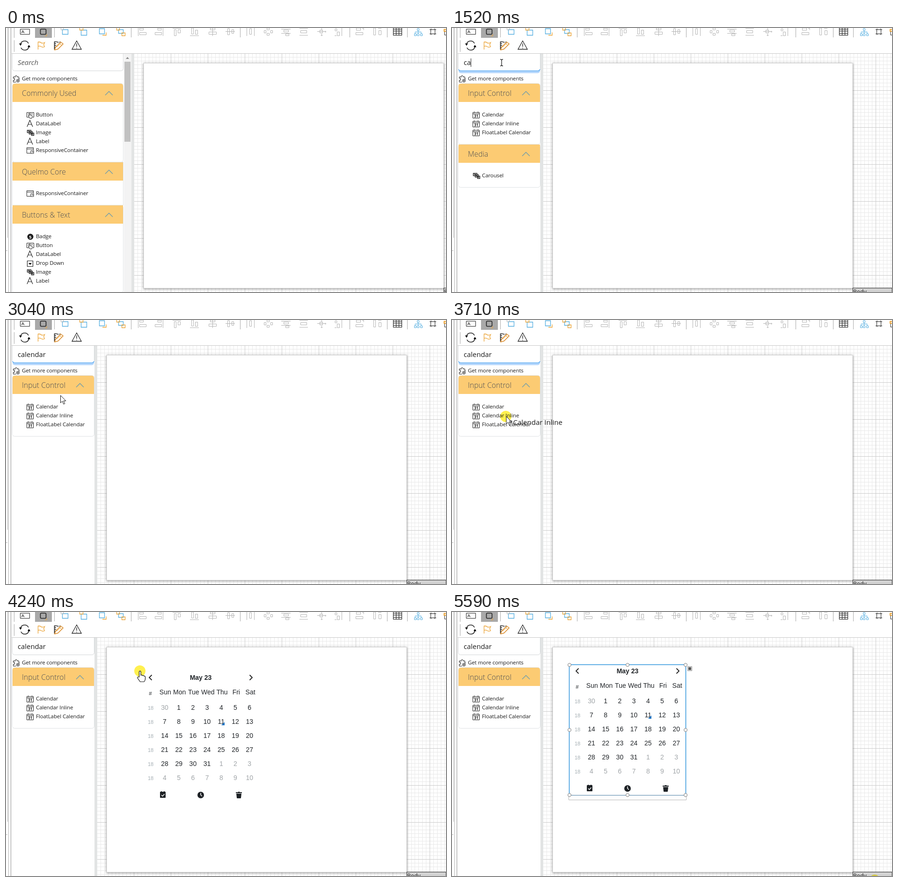
These frames come from a looping animation (940x564 px, 5.66 s). An HTML page:

```html
<!DOCTYPE html>
<html lang="en">
<head>
<meta charset="utf-8">
<title>Form designer</title>
<style>
html, body { margin: 0; height: 100%; overflow: hidden; background: #fff; }
svg { display: block; width: 100vw; height: 100vh; }
text { font-family: "Open Sans", "Noto Sans", sans-serif; fill: #1c1c1c; }
.item { font-size: 11.5px; letter-spacing: -.1px; }
.title { font-size: 15.7px; font-weight: 300; fill: #4c4f54; }
.input { font-size: 14.85px; }
.hint { font-style: italic; fill: #555; }
.drag { font-size: 15px; }
.cal text { font: 14px "Liberation Sans", Arial, sans-serif; fill: #212529; text-anchor: middle; }
.cal .month { font-weight: bold; }
.cal .week { font-size: 11px; fill: #a3adb2; }
.cal .hash { font-size: 11.5px; }
.cal .muted { fill: #a0a5a8; }
.line { fill: none; stroke: #222; }
.grey { fill: none; stroke: #b4b4b4; }
.blue { fill: none; stroke: #55aee0; }
.gold { fill: none; stroke: #eba53a; }
.spot { fill: #fff04f; mix-blend-mode: multiply; }
</style>
</head>
<body>
<svg id="stage" viewBox="0 0 940 564" xmlns="http://www.w3.org/2000/svg">
  <defs>
    <pattern id="grid" width="79" height="79" patternUnits="userSpaceOnUse"></pattern>
    <filter id="shadow" x="-5%" y="-5%" width="110%" height="110%">
      <feDropShadow dx="0" dy="1" stdDeviation="2" flood-color="#000" flood-opacity=".5"/>
    </filter>
    <g id="i-button">
      <path class="line" d="M5 5.500H.5V-4.500H15.500V5.500H13M3-1.500h3M3 1.500h2M10-1.500h3"/>
      <path d="M6 2V-2.500q1-1 2 0V1l4 1v3l-1 3H7L4 3Z" fill="#fff" stroke="#222"/>
    </g>
    <path id="i-label" class="line" stroke-width="1.200" d="M1 7 7-7 13 7M3.200 2H10.800"/>
    <g id="i-image" class="line">
      <path d="M1.500-4.500h8v5h-8zM5.500-1.500h7v5h-7z" fill="#fff" stroke-width="1.400"/>
      <path d="M10.500 1.500h5v5h-5zM3-2.500h4M8 1.500h3M12 4h2" stroke-width="1.400"/>
    </g>
    <g id="i-container">
      <path class="line" d="M9 6.500H.5V-5.500H14.500V0M.5-2.500h14"/>
      <path d="M9 1h6v6H9z" fill="#fff" stroke="#222"/><path d="M11 3h3v2z" fill="#222"/>
    </g>
    <g id="i-badge">
      <circle cx="8" cy="1" r="6.500" fill="#1d1d1d"/>
      <text x="5.300" y="4.500" font-size="9.500" font-weight="700" style="fill:#fff">5</text>
    </g>
    <g id="i-drop">
      <path class="line" stroke-width="1.200" d="M1.500-4.500h12v12h-12z"/><path d="M4 0h7L7.500 4Z"/>
    </g>
    <g id="i-date">
      <path class="line" d="M.5-4.500h14v12H.5zM.5-1.500h14M3.500-6.500v3M11.500-6.500v3"/>
      <text x="3.200" y="6" font-size="8" font-weight="700">31</text>
    </g>
  </defs>

  <rect width="940" height="564" fill="#fff"/>
  <g id="field">
    <rect x="195" y="55" width="745" height="510" fill="url(#grid)"/>
    <rect x="215" y="75" width="641" height="481" fill="#fff" stroke="#aaa" stroke-width=".6" filter="url(#shadow)"/>
    <path d="M856 570V555.500H940V570" fill="#d2d2d2" stroke="#222"/>
    <text x="857" y="568" font-size="12">Body</text>
  </g>

  <g id="panel">
    <rect id="back" x="12" y="55" height="510" fill="#fff"/>
    <rect id="split" y="55" width="6" height="510" fill="#e2e4e4"/>
    <g id="scroll">
      <rect x="252" y="55" width="16" height="510" fill="#f3f3f3"/>
      <rect x="253" y="72" width="13" height="171" fill="#c1c1c1"/>
      <path d="M256 66h7l-3.500-4Z" fill="#888"/>
    </g>
    <rect id="glow" x="14" y="80" height="16.500" rx="5" fill="#b5d7fc"/>
    <rect id="box" x="13.500" y="50" height="41.500" rx="5" fill="#fff" stroke="#d3d6d8"/>
    <path id="rule" fill="none" stroke="#62aef2" stroke-width="1.500"/>
    <rect x="12" y="45" width="260" height="9" fill="#fff"/>
    <text id="hint" class="input hint" x="25" y="79">Search</text>
    <text id="query" class="input" x="25" y="79"></text>
    <path id="caret" class="line" d="M.5 65v18"/>
    <path class="line" d="M15.500 115.500v-4h3v-4h-3v-3h5q-2-3 1-3t2 3h4v4m-6 7h-6M28 107v3"/>
    <circle class="line" cx="25.500" cy="112.500" r="3.200"/><path class="line" d="M23.500 112.500h4M25.500 110.500v4"/>
    <text class="item" x="34" y="112">Get more components</text>
    <g id="all"></g><g id="some"></g><g id="few"></g>
  </g>

  <g id="chrome">
    <path class="grey" d="M3.500 0V448M5.500 0V564M0 475.500H3" />
    <path d="M10.500 0V564" stroke="#8e8e8e"/>
    <path d="M12 54.500H940" stroke="#c8c8c8"/>
    <path d="M17.500 0V21M17.500 26V51M103.500 0V20M267.500 0V20M500.500 0V20M734.500 0V20M814.500 0V20M857.500 0V20" stroke="#a9a9a9"/>
    <path class="line" d="M30.500 2.500h20v11h-20zM33 11l3-6 3 6M34.500 9h3"/>
    <rect x="62" y="0" width="36" height="21" fill="#a9a9a9"/>
    <rect class="line" x="73.500" y="2.500" width="12" height="11" rx="2" stroke-width="1.600"/>
    <path class="gold" d="M83 17h4v-4"/>
    <path class="blue" d="M120.500 3.500h12v10h-12zM160.500 4.500h12v11h-12zM199.500 1.500h11v11h-11zM240.500 3.500h10v8h-10z" stroke-width="1.300"/>
    <path class="gold" d="M157.500 0v4.500h7V0M206 15.500h8v-6M236.500 0v4.500h6V0M247.500 10.500h7v6h-7z" stroke-width="1.300"/>
    <path class="grey" d="M117.500 0v4h5V0"/>
    <g class="grey">
      <path d="M282.500 0v17M285.500.5h8v4h-8zM285.500 9.500h14v5h-14zM335.500 0v17M324 .5h8v4h-8zM318.500 9.500h14v5h-14z"/>
      <path d="M356 .5h18M359.500 3.500h4v13h-4zM367.500 3.500h5v7h-5zM393 16.500h19M396.500 0h4v13h-4zM404.500 4.500h5v9h-5z"/>
      <path d="M441.500 0v17M436.500 0h10v4h-10zM433.500 8.500h16v5h-16zM469 7.500h20M473.500 1.500h4v13h-4zM482.500 3.500h4v8h-4z"/>
      <path d="M514.500 0v17M530.500 0v17M520.500 1.500h4v12h-4zM557.500 0h5v4h-5zM551.500 5.500h4v5h-4zM565.500 5.500h4v5h-4zM557.500 11.500h5v4h-5z"/>
      <path d="M588 2.500h20M593.500 4.500h10v4h-10zM588 11.500h20M597.500 12.500h7v4h-7zM627 .5h18M627 15.500h18M629.500 5.500h13v5h-13z"/>
      <path d="M665 7.500h19M670.500 4.500h6v6h-6zM674.500 0v4m0 8v5m-2-2 2 2 2-2m5-9 2 2-2 2M703 2h4v4h-4zM707.500 8.500h5v8h-5zM717.500 0v17M702 16.500h4"/>
      <path d="M748.500 0h9v5h-9zM747.500 9.500h15v5h-15zM761 .5h3v4M785.500 0h4v15h-4zM796.500 5.500h5v9h-5zM795 .5h7"/>
    </g>
    <path class="line" d="M827.500 0v15.500h18V0M827 2.500h19M827 6.500h19M827 11.500h19M833.500 0v15M839.500 0v15" stroke-width="1.200"/>
    <path class="blue" d="M880.500 5v7M874 12V8.500h13V12M878.500 1.500h4v4h-4zM872.500 12.500h4v4h-4zM878.500 12.500h4v4h-4zM885.500 12.500h4v4h-4z"/>
    <path class="line" d="M907.500 3.500h9v9h-9zM905 3.500h3m0 0V1M919 3.500h-3V1M905 12.500h3V15M919 12.500h-3V15"/>
    <path class="gold" d="M940 3h-4v4h4" stroke-width="2"/><path class="line" d="M937 8v7h3"/>
    <path class="line" stroke-width="1.500" d="M31 35a9 9 0 0 1 17-2M49 40a9 9 0 0 1-17 2"/>
    <path d="M28 33h6l-3 5ZM46 41h6l-3-5Z"/>
    <path class="gold" d="M68.500 46V30q4-1 7 2 4 1 7-1l-2 5 2 4q-4 2-7 0-3-2-7-1" stroke-width="1.300"/>
    <path class="line" d="M103.500 46V29.500h6M104 33.500h3M104 37.500h3M104 41.500h3M111 29v3M115 29v3" stroke-width="1.500"/>
    <path d="M104 47l2-6 11-11 5 4-11 11Z" fill="#fff" stroke="#d98b2b" stroke-width="1.500"/><path class="gold" d="M114 32l5 5M108 41l9-8"/>
    <path class="line" stroke="#444" d="M151 27.500 161 45.500H141ZM151 33v7M151 42v1.500" stroke-width="1.300"/>
  </g>

  <g id="calendar" class="cal"></g>
  <circle id="spot" class="spot" r="12"/>
  <g id="pointer">
    <path id="arrow" d="M.5 0V16l4-3.500L7 18.800l2.700-1.100L7 11.800h5Z" fill="#fff" stroke="#111"/>
    <path id="beam" class="line" stroke-width="1.300" d="M-3-7q3 0 3 2V5q0 2-3 2M3-7Q0-7 0-5V5q0 2 3 2"/>
    <path id="hand" fill="#fff" stroke="#111" stroke-width="1.200" d="M-2 13V2a1.800 1.800 0 0 1 3.600 0V9q3-1 3.600 1 3-1 3.400 1 2.400-.4 2.400 2v4q0 3-2.400 6H0L-5.500 15q-1-3 3.500-2Z"/>
    <g id="ghost"><path class="line" d="M7 9.500h5.500v9"/><text class="drag" x="15" y="17.500">Calendar Inline</text></g>
  </g>
</svg>
<script>
const LOOP = 5660, STEP = 66.3;
const $ = id => document.getElementById(id);
const show = (id, on) => $(id).style.display = on ? '' : 'none';
const move = (id, x, y) => $(id).setAttribute('transform', `translate(${x} ${y})`);
const set = (id, attrs) => Object.entries(attrs).forEach(([k, v]) => $(id).setAttribute(k, v));
const ramp = (t, from, to) => Math.min(1, Math.max(0, (t - from) / (to - from)));

// Grid: ten fine cells in each coarse one
$('grid').setAttribute('patternTransform', 'translate(194 54)');
for (let i = 9; i >= 0; i--) {
  const p = Math.round(i * 7.9) + .5;
  $('grid').innerHTML += `<path d="M${p} 0V79M0 ${p}H79" stroke="${i ? '#e9e9e9' : '#cbcbcb'}"/>`;
}

function section(y, width, title, items, first, last) {
  const right = 14 + width, height = 73 + 19 * items.length, r = first ? 5 : 0;
  const rows = items.map(([icon, name], i) => {
    const mid = y + 66 + 19 * i;
    return `<use href="#i-${icon}" x="44" y="${mid}"/><text class="item" x="64" y="${mid + 4}">${name}</text>`;
  }).join('');
  return `<rect x="13.500" y="${y - .5}" width="${width + 1}" height="${height}" rx="${last ? 5 : r}" fill="#fff" stroke="#dfe2e4"/>
    <path d="M14 ${y + 39}V${y + r}q0-${r} ${r}-${r}H${right - r}q${r} 0 ${r} ${r}V${y + 39}Z" fill="#fccb73"/>
    <text class="title" x="34" y="${y + 26}">${title}</text>
    <path d="M${right - 38} ${y + 24.5}l8-8 8 8" fill="none" stroke="#6f9cae" stroke-width="1.300"/>${rows}`;
}

function accordion(width, sections) {
  let y = 119;
  return sections.map(([title, items], i) => {
    const part = section(y, width, title, items, i === 0, i === sections.length - 1);
    y += 73 + 19 * items.length;
    return part;
  }).join('');
}

const button = ['button', 'Button'], data = ['label', 'DataLabel'], image = ['image', 'Image'],
  label = ['label', 'Label'], container = ['container', 'ResponsiveContainer'];
const inputs = ['Input Control', ['Calendar', 'Calendar Inline', 'FloatLabel Calendar'].map(n => ['date', n])];
$('all').innerHTML = accordion(236, [
  ['Commonly Used', [button, data, image, label, container]],
  ['Quelmo Core', [container]],
  ['Buttons &amp; Text', [['badge', 'Badge'], button, data, ['drop', 'Drop Down'], image, label]]
]);
$('some').innerHTML = accordion(174, [inputs, ['Media', [['image', 'Carousel']]]]);
$('few').innerHTML = accordion(174, [inputs]);

function calendar() {
  const word = (x, y, s, c = '') => `<text x="${x}" y="${y}" class="${c}">${s}</text>`;
  let out = '<rect width="249" height="279" fill="#fff"/>' +
    '<path class="line" stroke-width="1.800" d="M20.500 8.500 15 14l5.500 5.500M229.500 8.500 235 14l-5.500 5.500"/>' +
    word(125, 19, 'May 23', 'month') + word(17.500, 52, '#', 'hash');
  'Sun Mon Tue Wed Thu Fri Sat'.split(' ').forEach((d, i) => out += word(49.3 + 30.3 * i, 50, d));
  for (let row = 0; row < 6; row++) {
    out += word(18, 83 + 30 * row, 18, 'week');
    for (let col = 0; col < 7; col++) {
      const n = row * 7 + col;
      out += word(48 + 30.2 * col, 83 + 30 * row, n ? (n - 1) % 31 + 1 : 30, n < 1 || n > 31 ? 'muted' : '');
    }
  }
  out += `<path d="M176 109v7h-7Z" fill="#1b74c5"/><g fill="#1d2125">
    <path d="M38 260h12v10q0 1-1 1H39q-1 0-1-1ZM38 259q0-1 1-1h10q1 0 1 1v1H38ZM40 257h2v2h-2zM46 257h2v2h-2z"/>
    <circle cx="125" cy="265" r="7"/><path d="M200 259h4l1-1h3l1 1h4v2h-13ZM201 262h11l-1 9q0 1-1 1h-7q-1 0-1-1Z"/></g>
    <path d="M41 265l2.500 2.500 4-4.500M125 260.500V265l3 2.500" fill="none" stroke="#fff" stroke-width="1.500"/>`;
  const knobs = [[0, 0], [1, 0], [2, 0], [0, 1], [2, 1], [0, 2], [1, 2], [2, 2]]
    .map(([i, j]) => `<circle cx="${1 + 124 * i}" cy="${1 + 139 * j}" r="3.500" fill="#fff" stroke="#777"/>`).join('');
  return out + `<g id="selection"><path class="grey" d="M-.5 279v10.500h251V279"/>
    <path d="M.5 279V.5H249.500V279" fill="none" stroke="#2c93dc" stroke-width="1.500"/><path d="M0 279.500H250" stroke="#4a7fa5"/>
    ${knobs}<path d="M253.500 4.500h9v9h-9z" fill="#fff" stroke="#888"/><path d="M255 6h6v6h-6z" fill="#555"/></g>`;
}
$('calendar').innerHTML = calendar();

// Pointer positions, one per tick, from each start time
const moves = [
  [190, [[477, 440], [455, 412], [412, 365], [352, 305], [284, 240], [216, 178], [160, 125], [122, 87], [106, 73]]],
  [785, [[106, 74]]],
  [2770, [[106, 79], [107, 88], [110, 104], [113, 132], [116, 161], [117, 182], [117, 196], [116, 203], [115.500, 206]]],
  [3710, [[115.500, 206], [124, 205], [148, 200], [184, 193], [232, 183], [288, 176], [314, 163], [304, 143], [286.500, 126],
    [276, 121], [265, 117], [256, 113], [251, 112]]],
  [4720, [[255, 112], [276, 116], [308.500, 126.500], [380, 178], [490, 262], [605, 354], [710, 434], [792, 493], [848, 534], [867, 549]]]
];
const keys = [[1450, 'c'], [1520, 'a'], [1650, 'l'], [1850, 'e'], [1990, 'n'], [2050, 'd'], [2110, 'a'], [2250, 'r']];

function pointerAt(t) {
  const [start, points] = moves.filter(m => t >= m[0] - 5).pop() || moves[0];
  const tick = Math.max(0, Math.floor((t - start + 6) / STEP));
  return points[Math.min(points.length - 1, tick)];
}

function render(t) {
  const narrow = t >= 1515, width = narrow ? 174 : 236;
  move('field', narrow ? 0 : 79, 0);
  set('back', { width: width + 2 });
  set('split', { x: narrow ? 189 : 268 });
  set('box', { width: width + 1 });
  set('glow', { width });
  set('rule', { d: `M14 88q1 3.500 4 3.500H${10 + width}q3 0 4-3.500` });
  show('scroll', !narrow);
  show('all', !narrow);
  show('some', narrow && t < 1645);
  show('few', t >= 1645);

  const focus = ramp(t, 790, 1050) * (1 - ramp(t, 3720, 4040));
  set('glow', { opacity: focus });
  set('rule', { opacity: focus });
  const typed = keys.filter(k => t >= k[0] - 4).map(k => k[1]).join('');
  $('query').textContent = typed;
  show('hint', !typed);
  show('caret', t >= 850 && t < 2766);
  move('caret', 25 + Math.round(typed ? $('query').getComputedTextLength() : 0), 0);

  const [x, y] = pointerAt(t);
  const dragging = t >= 3706 && t < 4716, over = dragging && x > 215, placed = t >= 5115;
  const beam = t >= 785 && t < 3000 && y < 95, parked = t >= 5586;
  show('pointer', t >= 186 && t < 5386);
  move('pointer', x, y);
  show('arrow', !beam && !over);
  show('beam', beam);
  show('hand', over);
  show('ghost', dragging && !over);
  show('spot', (t >= 850 && t < 985) || (t >= 3366 && t < 4716) || parked);
  move('spot', parked ? 903 : x - .5, parked ? 573 : y);
  show('calendar', over || placed);
  show('selection', placed);
  move('calendar', placed ? 250 : x + 4.5 * ramp(x, 251, 286), placed ? 112 : y);
}

const origin = performance.now();
function loop() {
  render((performance.now() - origin) % LOOP);
  requestAnimationFrame(loop);
}
loop();
</script>
</body>
</html>
```
